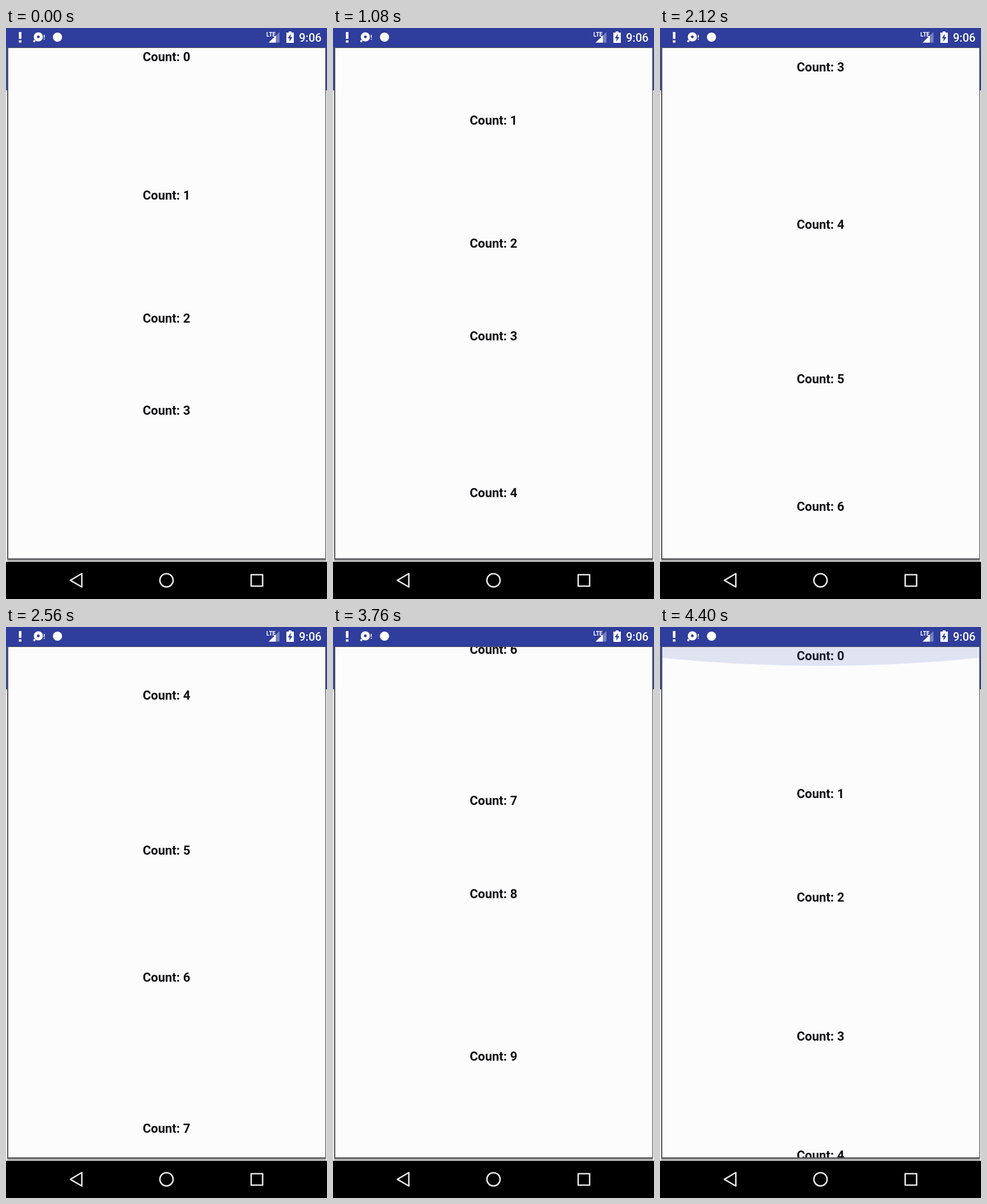
Recreate the animation shown at these times as an HTML page with a canvas. Size 561 px wide and 998 px high, loop 4.64 s.

```html
<!DOCTYPE html>
<html lang="en">
<head>
<meta charset="utf-8">
<title>Counting list</title>
<style>
  html, body { margin: 0; width: 100%; height: 100%; overflow: hidden; background: #000; }
  canvas { display: block; }
</style>
</head>
<body>
<canvas id="stage" width="561" height="998"></canvas>
<script>
const ctx = document.getElementById('stage').getContext('2d');
const LOOP = 4640;
const CARD = { left: 3, top: 35, right: 558, bottom: 928 };
const INK = '#111114', PAPER = '#fcfcfd', BAR = '#2f3d9c', NAV = '#e6e6e6';

// Vertical centre of every label inside the scrolled content.
const firstList = [50, 291.9, 507, 668.4, 943, 1213.4, 1435.6, 1699.7, 1862.6, 2146.6, 2409.6];
const secondList = [50, 291, 472, 715, 923];

// The screen only refreshes at these moments: [time, scroll offset].
const scrollSteps = [
  [0, 0], [800, 50], [840, 105], [1080, 130.6], [1440, 257], [1600, 345], [1680, 431],
  [2120, 600], [2360, 770], [2560, 823.6], [2920, 748], [3160, 1190], [3360, 1553.6], [3760, 1397]
];

// Overscroll glow at the top edge after the list has been flung back.
const glowSteps = [
  [4160, { side: 87, middle: 125, alpha: 0.42 }],
  [4400, { side: 54, middle: 68, alpha: 0.15 }]
];

const latest = (steps, t) => steps.reduce((value, [at, next]) => (t >= at ? next : value), null);

function rect(color, x, y, w, h) {
  ctx.fillStyle = color;
  ctx.fillRect(x, y, w, h);
}

function disc(color, x, y, r) {
  ctx.fillStyle = color;
  ctx.beginPath();
  ctx.arc(x, y, r, 0, Math.PI * 2);
  ctx.fill();
}

function path(points) {
  ctx.beginPath();
  points.forEach(([x, y]) => ctx.lineTo(x, y));
  ctx.closePath();
}

function polygon(color, points) {
  ctx.fillStyle = color;
  path(points);
  ctx.fill();
}

function text(value, x, y, font, color, align) {
  ctx.font = font + ' Roboto, sans-serif';
  ctx.fillStyle = color;
  ctx.textAlign = align;
  ctx.fillText(value, x, y);
}

function drawStatusBar() {
  rect(BAR, 0, 0, 561, 34);
  rect('#fff', 22.5, 7, 4.5, 12);
  rect('#fff', 22.5, 21.5, 4.5, 4);

  disc('#fff', 56.5, 15.5, 8);
  disc(BAR, 56.5, 15.5, 2.4);
  disc('#fff', 49.5, 23, 2);
  rect('#fff', 66, 12, 1.6, 5);
  rect('#fff', 66, 18.5, 1.6, 2);

  disc('#fff', 90, 16, 8);

  polygon('#7680bd', [[459, 25.5], [478, 7], [478, 25.5]]);
  polygon('#fff', [[459, 25.5], [471.5, 13.3], [471.5, 25.5]]);
  rect(BAR, 454, 5, 15, 11);
  text('LTE', 455, 15, 'bold 10px', '#fff', 'left');

  rect('#fff', 490, 8, 13, 18);
  rect('#fff', 494, 6, 5, 2);
  polygon(BAR, [[498, 10], [492.5, 18], [495.8, 18], [495, 24], [500.6, 16], [497.2, 16]]);
  text('9:06', 512, 24, '500 20px', '#fff', 'left');
}

function drawNavigation() {
  rect('#000', 0, 933, 561, 65);
  ctx.strokeStyle = NAV;
  ctx.lineWidth = 2.6;
  ctx.lineJoin = 'round';
  path([[112.5, 965.3], [132.5, 953.5], [132.5, 977]]);
  ctx.stroke();
  ctx.beginPath();
  ctx.arc(280.5, 965.3, 11.6, 0, Math.PI * 2);
  ctx.stroke();
  ctx.strokeRect(428.5, 955.5, 20, 20);
}

function drawCard() {
  rect('#f0f0f0', 0, 34, 561, 899);
  rect('#3648ab', 0, 34, 561, 75);
  rect('rgba(0,0,0,.25)', 2, 34, 1, 895);
  rect('rgba(0,0,0,.3)', 558, 36, 1.5, 893);

  const shade = ctx.createLinearGradient(0, 928, 0, 933);
  shade.addColorStop(0, '#747474');
  shade.addColorStop(1, '#dcdcdc');
  rect(shade, 2, 928, 557, 5);

  rect('#505154', CARD.left - 1, CARD.top - 1, 557, 895);
  rect(PAPER, CARD.left + 1, CARD.top, 554, 892);
}

function drawGlow({ side, middle, alpha }) {
  ctx.fillStyle = `rgba(63,81,181,${alpha})`;
  ctx.beginPath();
  ctx.moveTo(CARD.left, CARD.top);
  ctx.lineTo(CARD.left, side);
  ctx.quadraticCurveTo(280.5, 2 * middle - side, CARD.right, side);
  ctx.lineTo(CARD.right, CARD.top);
  ctx.fill();
}

function drawList(t) {
  const glow = latest(glowSteps, t);
  const centers = glow ? secondList : firstList;
  const offset = glow ? 0 : latest(scrollSteps, t);

  ctx.save();
  ctx.beginPath();
  ctx.rect(CARD.left + 1, CARD.top, 554, 892);
  ctx.clip();
  centers.forEach((center, i) => {
    text('Count: ' + i, 280.5, Math.round(center - offset) + 8, 'bold 22px', INK, 'center');
  });
  if (glow) drawGlow(glow);
  ctx.restore();
}

function render() {
  drawCard();
  drawStatusBar();
  drawNavigation();
  drawList(performance.now() % LOOP);
  requestAnimationFrame(render);
}

render();
</script>
</body>
</html>
```
